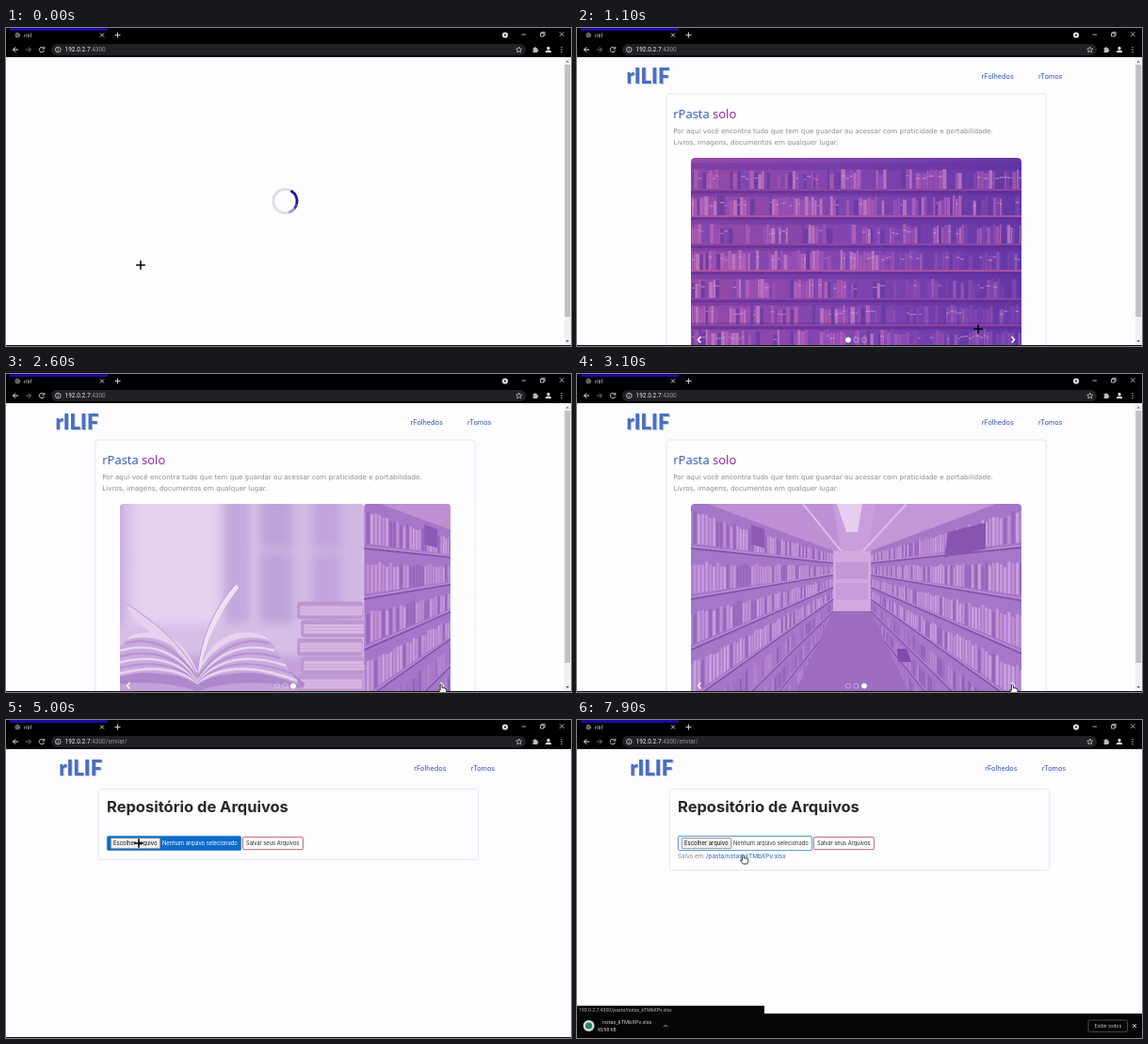
An HTML page for the animation above (8 s loop, 600x338 px).

```html
<!DOCTYPE html>
<html lang="pt">
<head>
<meta charset="utf-8">
<style>
html, body { margin: 0; width: 100%; height: 100%; overflow: hidden; background: #000; }
svg { display: block; width: 100vw; height: 100vh; }
text { font-family: Inter, sans-serif; white-space: pre; }
.ui { font-family: Roboto, sans-serif; }
.body { font-family: "DejaVu Sans", sans-serif; }
.title { font-family: "Open Sans", sans-serif; }
.logo { font-family: Lato, sans-serif; font-weight: 900; }
</style>
</head>
<body>
<svg id="stage" viewBox="0 0 600 338" preserveAspectRatio="none"></svg>
<script>
const LOOP = 8000;
const HOST = '192.0.2.7', PORT = ':4300';
const UPLOAD = '/enviar/', SAVED = '/pasta/notas_kTMbXPv.xlsx';
const INDIGO = '#2512a6', LINK = '#2f52bd';

const rect = (x, y, w, h, fill, more = '') =>
  `<rect x="${x}" y="${y}" width="${w}" height="${h}" fill="${fill}" ${more}/>`;
const text = (x, y, size, fill, value, more = '') =>
  `<text x="${x}" y="${y}" font-size="${size}" fill="${fill}" ${more}>${value}</text>`;
const line = (d, color, width = 1, more = '') =>
  `<path d="${d}" fill="none" stroke="${color}" stroke-width="${width}" ${more}/>`;
const shape = (d, fill, more = '') => `<path d="${d}" fill="${fill}" ${more}/>`;
const disc = (x, y, r, fill, more = '') => `<circle cx="${x}" cy="${y}" r="${r}" fill="${fill}" ${more}/>`;
const group = (id, content, more = '') => `<g id="${id}" ${more}>${content}</g>`;
const mix = (a, b, k) => a + (b - a) * k;
const clamp = v => Math.max(0, Math.min(1, v));
const ease = k => k * k * (3 - 2 * k);

function seeded(seed) {
  return () => (seed = (seed * 16807) % 2147483647) / 2147483647;
}

function browser() {
  return rect(0, 0, 600, 31, '#000') +
    rect(4, 0, 104, 3, '#1b0b9c', 'rx="1"') +
    text(19, 9.5, 6, '#c8c8c8', 'rIlif', 'class="ui"') +
    disc(12.3, 7.5, 2.8, '#777') + line('M10 6.5l2 1 1 2M13 5l1.5 2', '#222', .8) +
    line('M100 5.5l4 4m0-4l-4 4', '#ddd', .9) +
    line('M115.5 7.5h6m-3-3v6', '#ddd', .9) +
    disc(530, 7.5, 3.1, '#ddd') + disc(530, 7.5, 1, '#111') +
    line('M547.5 7h4.5M567.5 5.5h3.5v3.5h-3.5ZM568.8 5.3v-1h3.4v3.5h-1M588 4.3l4.5 4.5m0-4.5l-4.5 4.5', '#ddd', .8) +
    rect(48, 17, 504, 12, '#202124', 'rx="6"') +
    line('M13 23H7.5m2.7-2.7L7.5 23l2.7 2.7', '#eee', 1) +
    line('M21 23h5.5m-2.7-2.7l2.7 2.7-2.7 2.7', '#777', 1) +
    line('M40.3 21.6a2.7 2.7 0 1 0 .3 2.2M40.8 19.8v2.2h-2.3', '#ddd', .9) +
    line('M52.5 23a2.8 2.8 0 1 1 5.6 0a2.8 2.8 0 1 1-5.6 0M55.3 22.5v2M55.3 21v.7', '#ddd', .8) +
    `<text x="62.5" y="25.2" font-size="6.5" class="ui" fill="#eee">${HOST}<tspan id="path" fill="#92959a"></tspan></text>` +
    line('M544.7 20l.9 2 2.1.2-1.6 1.5.5 2.1-1.9-1.1-1.9 1.1.5-2.1-1.6-1.5 2.1-.2Z', '#ddd', .7) +
    shape('M559.5 21.3h1.3a1.1 1.1 0 1 1 2.2 0h1.3v1.4a1.1 1.1 0 1 1 0 2.2v1.2h-4.8v-1.5a1.1 1.1 0 0 0 0-2Z', '#bbb') +
    disc(576, 21.4, 1.6, '#eee') + shape('M572.8 26q0-2.6 3.2-2.6t3.2 2.6Z', '#eee') +
    disc(590, 20.6, .7, '#ddd') + disc(590, 23, .7, '#ddd') + disc(590, 25.4, .7, '#ddd');
}

const nav = () =>
  text(53.5, 59.7, 22, '#c5d3ee', 'rILIF', 'class="logo"') +
  text(52.5, 59, 22, '#4a6fc0', 'rILIF', 'class="logo"') +
  text(429.5, 54, 7.3, LINK, 'rFolhedos') +
  text(490, 54, 7.3, LINK, 'rTomos');

function bookcase() {
  const rnd = seeded(41);
  let out = rect(121, 138, 351, 200, 'url(#caseTone)');
  const floors = [171, 199, 229, 257, 287, 315, 341];
  floors.forEach((floor, row) => {
    out += rect(121, floor - 28, 351, 8, '#6330a0', 'opacity=".4"');
    for (let x = 122; x < 470;) {
      const w = 1.6 + rnd() * 3, h = 15 + rnd() * 6;
      const gap = rnd() < .06 ? 5 + rnd() * 12 : .5;
      const tone = ['#b765bd', '#9a52b8', '#7b48b3', '#c47dc6', '#663a9f', '#a95cae'][Math.floor(rnd() * 6)];
      const shade = x > 325 && row > 2 ? .4 : .8;
      out += rect(x, floor - h, Math.min(w, 471 - x), h, tone, `opacity="${shade}"`);
      if (rnd() < .3) out += rect(x, floor - h * .7, w, 1.3, '#d9a0d4', 'opacity=".6"');
      x += w + gap;
    }
    out += rect(121, floor, 351, 2, '#b5579f', 'opacity=".85"') + rect(121, floor + 2, 351, 3, '#55278f', 'opacity=".5"');
  });
  return out;
}

function bookStack(x) {
  let out = '';
  for (let i = 0; i < 5; i++) {
    const y = 242 + i * 19.5, left = x + (i % 2) * 4;
    out += rect(left, y, 70, 18.5, '#bd96d2', 'rx="3"') + rect(left + 3, y + 4.5, 66, 10, '#d6b6e1') +
      line(`M${left + 3} ${y + 8}h66m-66 3h66`, '#c6a3d8', .7);
  }
  return out;
}

function openBook() {
  let out = rect(121, 138, 351, 200, '#d6bfe6');
  const blurs = [[121, 36, '#deb0d6'], [155, 30, '#bb9cd6'], [187, 28, '#c3a6dc'], [226, 92, '#e5d2f0'],
    [324, 26, '#c3a8dd'], [362, 34, '#bfa2da'], [398, 16, '#d1bae4'], [416, 32, '#c2a5db'], [450, 22, '#d0b6e3']];
  out += `<g filter="url(#soft)">${blurs.map(([x, w, c]) => rect(x, 130, w, 135, c)).join('')}` +
    rect(155, 196, 66, 4, '#d3bbe5') + rect(352, 186, 100, 4, '#d5bde6') +
    rect(115, 300, 363, 44, '#c3a0da') + '</g>';
  out += bookStack(115) + bookStack(401);
  // Page block, mirrored around the spine
  let half = shape('M0 337Q-45 321 -112 334L-114 329L-96 314L0 322Z', '#ad88cb') +
    shape('M0 330Q-42 304 -108 330L-78 284Q-30 269 0 320Z', '#cbaadd');
  for (let i = 0; i < 6; i++) {
    const y = 326 - i * 8, x = -106 + i * 6;
    half += line(`M0 ${328 - i}Q${-38 + i} ${300 - i * 5} ${x} ${y}`, i % 2 ? '#b894d0' : '#e8d6f0', 2.4);
  }
  half += shape('M0 320Q-25 270 -76 282L-68 277Q-22 264 0 316Z', '#e6d3ee');
  out += `<g transform="translate(295 0)">${half}</g><g transform="translate(295 0) scale(-1 1)">${half}</g>`;
  return out +
    shape('M295 320Q276 280 220 244Q226 268 264 284Z', '#e6d0ee') +
    shape('M295 318Q299 264 336 223L339 227Q308 266 298 314Z', '#eddff4') +
    line('M295 320Q299 264 336 223M295 320Q276 280 220 244', '#b28dcc', .9);
}

function corridor() {
  const rnd = seeded(77);
  const ROWS = 8;
  let out = rect(121, 138, 351, 200, '#c99edc') +
    shape('M121 138H272L280 190H272Z', '#bd90d4') + shape('M472 138H318L306 190H312Z', '#c297d8') +
    shape('M276 138H303L298 168H286Z', '#e6cef0') + line('M240 138L282 190M350 138L302 190', '#dabbe8', 2) +
    rect(272, 188, 40, 64, '#d0a9e0') + rect(275, 200, 34, 18, '#c198d7') + rect(275, 222, 34, 18, '#c59dda');
  for (const side of [-1, 1]) {
    const at = k => 292 + side * mix(20, 180, k);
    const edge = (level, k) => mix(mix(188, 252, level), mix(128, 410, level), k);
    let shelf = shape(`M${at(0)} 188L${at(1)} 128V600L${at(0)} 300Z`, '#a577c8');
    for (let row = 0; row < ROWS; row++) {
      for (let k = 0; k < 1;) {
        const step = .007 + k * .022, next = Math.min(1, k + step * .72);
        const top = (row + .25 + rnd() * .12) / 5, base = (row + .9) / 5;
        const tones = row < 4 ? ['#c398da', '#bb8fd5', '#9467ba', '#c8a0dd'] : ['#a87bc9', '#9d70c2', '#8e60b7', '#b489d0'];
        shelf += shape(`M${at(k)} ${edge(top, k)}L${at(next)} ${edge(top, next)}V${edge(base, next)}L${at(k)} ${edge(base, k)}Z`,
          tones[Math.floor(rnd() * 4)]);
        k += step;
      }
      const level = (row + 1) / 5;
      shelf += line(`M${at(0)} ${edge(level, 0)}L${at(1)} ${edge(level, 1)}`, '#8455b0', 2) +
        line(`M${at(0)} ${edge(level, 0) - 1}L${at(1)} ${edge(level, 1) - 2}`, '#caa2df', .8);
    }
    out += shelf;
  }
  return out + shape('M272 252H312L352 338H232Z', '#9c6cc0') +
    shape('M394 168L434 158V186L390 195Z', '#8656b1') + shape('M185 160l14 5v20l-14-4Z', '#8a5ab4') +
    shape('M340 292h10l5 14h-14Z', '#7d4dab');
}

const chevron = (x, dir) => line(`M${x - dir * 1.5} 328l${dir * 3} 3.3l${-dir * 3} 3.3`, '#fff', 1.5);

const home = () => nav() +
  rect(95, 70, 403, 300, '#fefdff', 'rx="3" stroke="#e2dfe8" stroke-width=".8"') +
  `<text x="102.3" y="96.3" font-size="13" class="title" fill="#3458b8">rPasta <tspan fill="#8a1fa0">solo</tspan></text>` +
  text(102.3, 112.3, 7.17, '#8b8b90', 'Por aqui você encontra tudo que tem que guardar ou acessar com praticidade e portabilidade.', 'class="body"') +
  text(102.3, 123.6, 7.17, '#8b8b90', 'Livros, imagens, documentos em qualquer lugar.', 'class="body"') +
  `<g clip-path="url(#frame)">` +
  [bookcase, openBook, corridor].map((draw, i) => group('slide' + i, draw(), 'clip-path="url(#frame)"')).join('') +
  [0, 1, 2].map(i => disc(288 + i * 8.5, 331.5, 2.6, '#fff', `id="dot${i}" stroke="#fff" stroke-width=".8"`)).join('') +
  chevron(130, -1) + chevron(463, 1) + '</g>' +
  rect(592.5, 31, 7.5, 307, '#f1f1f1') + rect(593.3, 39, 5.9, 268, '#c1c1c1') +
  shape('M594.4 36.5h3.6l-1.8-2Z', '#777') + shape('M594.4 332h3.6l-1.8 2Z', '#555');

const upload = () => group('uploadNav', nav(), 'transform="translate(3.7 .4)"') +
  rect(98.3, 73.5, 403.4, 75, '#fefdff', 'id="card" rx="3" stroke="#e2dfe8" stroke-width=".8"') +
  text(107, 98, 16.5, '#26282b', 'Repositório de Arquivos', 'font-weight="700"') +
  rect(107.4, 123.4, 142.2, 15.2, '#fff', 'id="picker" rx="1.5" stroke="#3e8bd2" stroke-width=".9"') +
  rect(111.3, 125.5, 52.4, 11.2, '#efefef', 'rx="1" stroke="#808080" stroke-width=".8"') +
  text(114, 133.3, 5.9, '#111', 'Escolher arquivo') +
  text(166, 133.3, 5.8, '#333', '', 'id="chosen"') +
  rect(251.4, 124.4, 64, 13.3, '#fff', 'id="save" rx="1.5" stroke="#ba5564" stroke-width=".9"') +
  text(255, 133.3, 5.7, '#222', 'Salvar seus Arquivos', 'id="saveLabel"') +
  group('result', text(107, 147.4, 6.3, '#85858a', 'Salvo em:') + text(137, 147.4, 6.5, '#1e62c4', SAVED));

const arc = (from, to, color) => {
  const p = a => `${12.6 * Math.cos(a * Math.PI / 180)} ${12.6 * Math.sin(a * Math.PI / 180)}`;
  return line(`M${p(from)}A12.6 12.6 0 0 1 ${p(to)}`, color, 2.8);
};

const loader = () => rect(0, 31, 593, 306, '#fefcff') + group('ring',
  disc(0, 0, 12.6, 'none', 'stroke="#dedde4" stroke-width="2.8"') +
  group('arc', arc(-62, 14, INDIGO) + arc(14, 40, '#4b3ab5') + arc(40, 72, '#9d96d6')));

const downloads = () => rect(0, 312, 600, 26, '#050506') +
  disc(12.5, 325, 6, '#d7d9d8') + disc(12.5, 325, 3.6, '#26885a') +
  text(27, 323.2, 5.7, '#ccc', SAVED.slice(7), 'class="ui"') +
  text(21.5, 331, 4.8, '#ccc', '98/98 KB', 'class="ui"') +
  line('M92 326.2l2-2 2 2', '#bbb', .9) +
  rect(543, 319, 41.5, 12.4, 'none', 'rx="1.5" stroke="#55585c" stroke-width=".8"') +
  text(549.5, 327, 5.5, '#bbb', 'Exibir todos', 'class="ui"') +
  line('M590 323l4 4m0-4l-4 4', '#ddd', .9);

const stage = document.getElementById('stage');
stage.innerHTML = `<defs>
  <clipPath id="frame"><path d="M121 338V142q0-4 4-4H468q4 0 4 4V338Z"/></clipPath>
  <filter id="soft"><feGaussianBlur stdDeviation="5"/></filter>
  <linearGradient id="caseTone"><stop stop-color="#964aa6"/><stop offset=".5" stop-color="#8044af"/><stop offset="1" stop-color="#6236a6"/></linearGradient>
  </defs>` +
  rect(0, 31, 600, 307, '#fefcff') +
  group('home', home()) + group('upload', upload()) + group('loader', loader()) +
  rect(0, 337, 600, 1, '#111') + browser() +
  group('downloads', downloads()) +
  group('status', rect(0, 0, 199, 8.5, '#050506') + text(2, 6.2, 5.15, '#bbb', '', 'id="statusText" class="ui"')) +
  group('cross', line('M-4.8 0H4.8M0-4.8V4.8', '#000', 1.5)) +
  group('hand', shape('M-1.6-4.2q1-1.3 2 0V-1q1-.8 1.6.2 1-.6 1.5.4 1.3-.4 1.3.9V2.5L3.6 5H-.6L-3.8 1.2q.4-1.4 2.2.2Z', '#fff', 'stroke="#222" stroke-width=".9"'));

const el = {};
stage.querySelectorAll('[id]').forEach(node => el[node.id] = node);
const set = (id, attrs) => { for (const key in attrs) el[id].setAttribute(key, attrs[key]); };
const show = (id, on) => set(id, { display: on ? 'inline' : 'none' });

// Pointer stops: time, x, y
const route = [[0, 143, 252], [450, 143, 252], [1100, 426, 320], [1400, 462, 334], [3150, 463, 335],
  [3750, 447, 52], [4250, 447, 52], [4950, 141, 131], [5600, 141, 131], [6750, 293, 136],
  [7000, 293, 136], [7500, 177, 148], [8000, 177, 148]];

function pointer(t) {
  const i = route.findIndex(stop => stop[0] > t);
  const [t0, x0, y0] = route[i - 1], [t1, x1, y1] = route[i];
  const k = ease((t - t0) / (t1 - t0));
  return [mix(x0, x1, k), mix(y0, y1, k)];
}

function render(t) {
  const [x, y] = pointer(t);
  const over = (l, top, r, b) => x >= l && x <= r && y >= top && y <= b;
  const atHome = t < 4000, saved = t >= 7150;
  const loading = t < 600 || (t >= 4000 && t < 4300) || (t >= 6950 && t < 7150);

  show('home', atHome);
  show('upload', !atHome);
  show('loader', loading);
  set('loader', { opacity: t < 600 ? 1 - clamp((t - 450) / 150) : 1 });
  set('ring', { transform: `translate(${atHome ? 296.5 : 300} 184)` });
  set('arc', { transform: `rotate(${t * .36})` });
  el.path.textContent = PORT + (atHome ? '' : UPLOAD);

  const position = ease(clamp((t - 1450) / 600)) + ease(clamp((t - 2400) / 600));
  const active = (t >= 1450) + (t >= 2400);
  for (let i = 0; i < 3; i++) {
    set('slide' + i, { transform: `translate(${(i - position) * 351} 0)` });
    set('dot' + i, { 'fill-opacity': i === active ? 1 : 0, 'stroke-opacity': i === active ? 1 : .5 });
  }

  const overPicker = over(107, 123, 250, 139), overSave = over(251, 124, 316, 138);
  set('card', { height: saved ? 86 : 75 });
  set('picker', { fill: overPicker ? '#0c6bcb' : '#fff' });
  set('chosen', { fill: overPicker ? '#fff' : '#333' });
  el.chosen.textContent = t >= 6400 && !saved ? 'notas.xlsx' : 'Nenhum arquivo selecionado';
  set('save', { fill: overSave ? '#b80f3c' : '#fff' });
  set('saveLabel', { fill: overSave ? '#fff' : '#222' });
  show('result', saved);

  const overNav = atHome && over(429, 46, 465, 57);
  const overResult = saved && over(137, 141, 223, 150);
  const barOpen = t >= 7700;
  show('downloads', barOpen);
  show('status', overNav || overResult);
  set('status', { transform: `translate(0 ${barOpen ? 303.7 : 328.7})` });
  el.statusText.textContent = HOST + PORT + (overNav ? UPLOAD : SAVED);

  const overArrow = atHome && over(450, 325, 472, 338);
  const hand = overArrow || overNav || overResult || (!atHome && overSave);
  show('hand', hand);
  show('cross', !hand);
  set('hand', { transform: `translate(${x} ${y})` });
  set('cross', { transform: `translate(${x} ${y})` });
}

const start = performance.now();
function tick() {
  render((performance.now() - start) % LOOP);
  requestAnimationFrame(tick);
}
tick();
</script>
</body>
</html>
```
